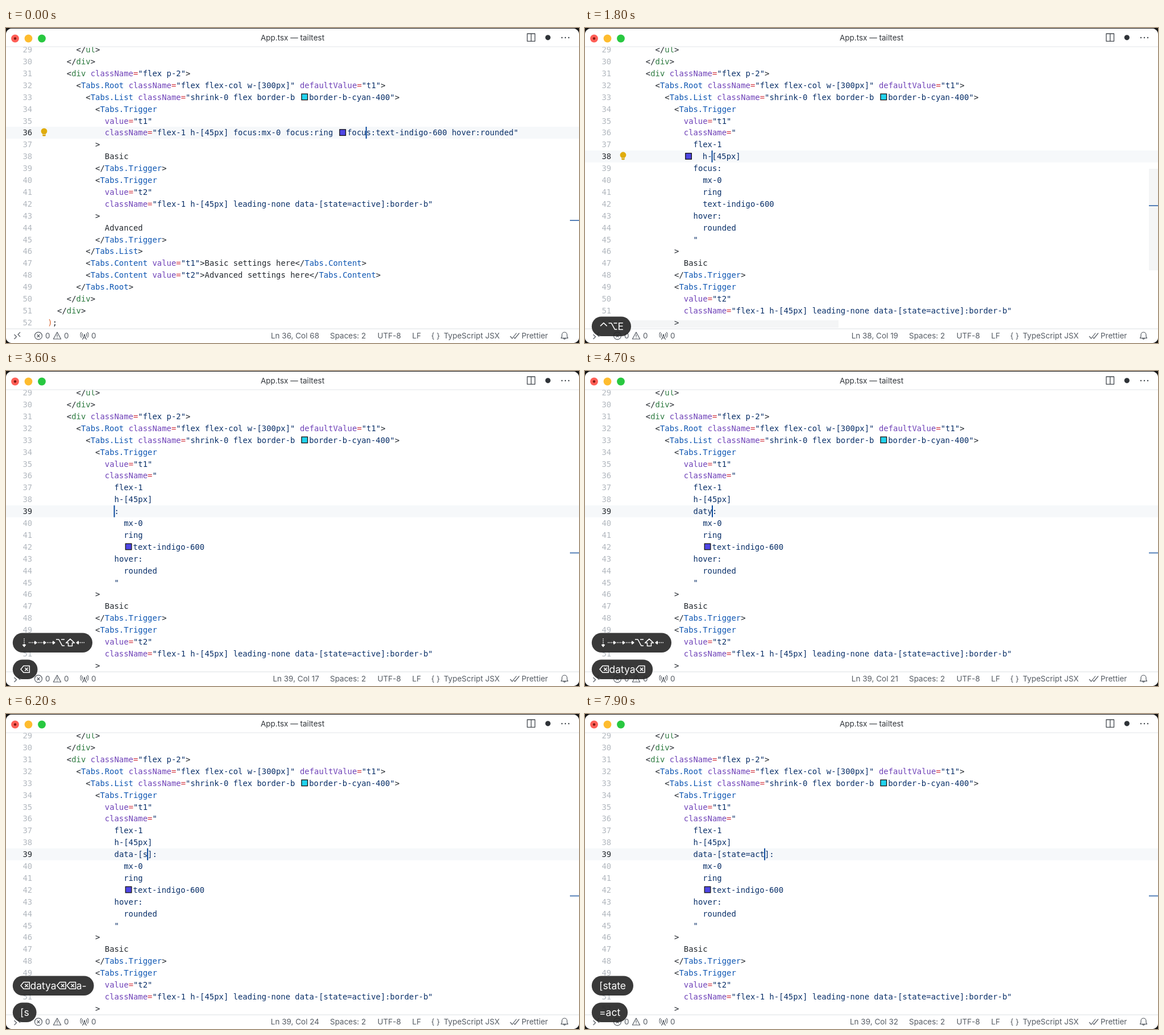
Animation of 1008x555 px, one loop 8000 ms. Source, as an HTML page:

```html
<!DOCTYPE html>
<html lang="en">
<head>
<meta charset="utf-8">
<title>Editor</title>
<style>
html, body { margin: 0; width: 100%; height: 100%; overflow: hidden; background: #151515; }
svg { display: block; width: 1008px; height: 555px; }
text { white-space: pre; }
.code { font: 13.9px "DejaVu Sans Mono", monospace; }
.ui { font: 13.5px Inter, sans-serif; fill: #565c64; }
.key { font: 17.5px Inter, sans-serif; fill: #fff; }
</style>
</head>
<body>
<svg id="stage" viewBox="0 0 1008 555" xml:space="preserve"></svg>
<script>
const LOOP = 8000;
const CW = 8.37, X0 = 56.6, ROW = 20.9, FIRST = 29, LAST = 52, SWATCH = 16.3;
const EXPAND = 700, RECOLOR = 1900, NAV = 2200, ERASE = 3400;
const C = { text: '#24292f', str: '#0a3069', html: '#2c7a3f', comp: '#0f57b3', attr: '#6f42b8', eq: '#d1333d', paren: '#d9622b' };
const swatches = { '¤': '#22d3ee', '§': '#4f46e5' };

// Pressed keys: [time, symbols]
const keys = [
  [EXPAND, '⌃⌥E'],
  [NAV, '⇣'], [2300, '⇢'], [2400, '⇢'], [2500, '⇢'], [2700, '⌥⇧⇠'],
  [ERASE, '⌫'], [3900, 'da'], [4100, 't'], [4200, 'y'], [4600, 'a'], [4700, '⌫'], [4800, '⌫'], [4900, 'a'], [5300, '-'],
  [6000, '['], [6200, 's'], [6400, 't'], [6500, 'a'], [6600, 't'], [6700, 'e'],
  [7300, '='], [7500, 'a'], [7700, 'c'], [7900, 't']
];

// Key symbols: advance and outline, relative to the baseline
const glyphs = {
  '⌃': [15.5, 'M2,-7L7.8,-12.5L13.6,-7'],
  '⌥': [17, 'M1,-12H6L12,-1H16M10,-12H16'],
  '⇧': [18, 'M9,-13L16.5,-6H12.5V-.5H5.5V-6H1.5Z'],
  '⌫': [17.5, 'M6,-12.5H16.3V-.8H6L1,-6.6ZM8.3,-9.3L13.6,-4M13.6,-9.3L8.3,-4'],
  '⇢': [16, 'M1,-6.5H2.6M4,-6.5H5.6M7,-6.5H8.6M10,-6.5H14.5M11.8,-8.8L14.8,-6.5L11.8,-4.2Z'],
  '⇠': [17, 'M16,-6.5H14.4M13,-6.5H11.4M10,-6.5H8.4M7,-6.5H2.5M5.2,-8.8L2.2,-6.5L5.2,-4.2Z'],
  '⇣': [14, 'M7,-13.5V-12M7,-10.5V-9M7,-7.5V-6M7,-4.5V0M4.7,-2.5L7,.5L9.3,-2.5Z']
};

const pen = document.createElement('canvas').getContext('2d');
const esc = s => s.replace(/&/g, '&amp;').replace(/</g, '&lt;');
const text = (cls, x, y, s, extra = '') => `<text class="${cls}" x="${x}" y="${y}" ${extra}>${esc(s)}</text>`;
const rect = (x, y, w, h, fill, extra = '') => `<rect x="${x}" y="${y}" width="${w}" height="${h}" fill="${fill}" ${extra}/>`;
const dot = (x, y, r, fill) => `<circle cx="${x}" cy="${y}" r="${r}" fill="${fill}"/>`;
const line = (d, color = '#565c64', w = 1.2) => `<path d="${d}" fill="none" stroke="${color}" stroke-width="${w}" stroke-linejoin="round"/>`;
const rowY = n => 59 + (n - 30) * ROW;
const colX = c => X0 + (c - 1) * CW;
const clamp = v => Math.max(0, Math.min(1, v));

const head = [
  '        </ul>',
  '      </div>',
  '      <div className="flex p-2">',
  '        <Tabs.Root className="flex flex-col w-[300px]" defaultValue="t1">',
  '          <Tabs.List className="shrink-0 flex border-b ¤border-b-cyan-400">',
  '            <Tabs.Trigger',
  '              value="t1"'
];
const tail = [
  '            >',
  '              Basic',
  '            </Tabs.Trigger>',
  '            <Tabs.Trigger',
  '              value="t2"',
  '              className="flex-1 h-[45px] leading-none data-[state=active]:border-b"',
  '            >',
  '              Advanced',
  '            </Tabs.Trigger>',
  '          </Tabs.List>',
  '          <Tabs.Content value="t1">Basic settings here</Tabs.Content>',
  '          <Tabs.Content value="t2">Advanced settings here</Tabs.Content>',
  '        </Tabs.Root>',
  '      </div>',
  '    </div>',
  '  );'
];

function codeLines(t, word) {
  if (t < EXPAND) return [...head,
    '              className="flex-1 h-[45px] focus:mx-0 focus:ring §focus:text-indigo-600 hover:rounded"', ...tail];
  const late = t >= RECOLOR, pad = '~' + ' '.repeat(16);
  return [...head, '              className="',
    pad + 'flex-1',
    late ? pad + 'h-[45px]' : '~' + ' '.repeat(14) + '§  h-[45px]',
    pad + word + ':',
    pad + '  mx-0', pad + '  ring',
    pad + (late ? '  §' : '  ') + 'text-indigo-600',
    pad + 'hover:', pad + '  rounded', pad + '"', ...tail];
}

function tokens(s) {
  if (s[0] === '~') return [[s.slice(1), C.str]];
  const re = /("[^"]*"?)|(?<=<\/?)([\w.]+)|(\w+)(?==)|(=)|(\))|(\w+|.)/g;
  return [...s.matchAll(re)].map(m => [m[0],
    m[1] ? C.str : m[2] ? (/^[a-z]/.test(m[2]) ? C.html : C.comp) : m[3] ? C.attr : m[4] ? C.eq : m[5] ? C.paren : C.text]);
}

function codeRow(s, y) {
  let x = X0, out = '';
  for (const [tok, color] of tokens(s))
    for (const part of tok.split(/([¤§])/)) {
      if (swatches[part]) {
        out += rect(x + 3, y - 5.6, 10.6, 10.6, swatches[part], 'stroke="#111" stroke-width="1.3"');
        x += SWATCH;
        continue;
      }
      const lead = part.length - part.trimStart().length;
      if (part.trim()) out += text('code', x + lead * CW, y + 5, part.slice(lead), `fill="${color}"`);
      x += part.length * CW;
    }
  return out;
}

function typedWord(t) {
  let w = '';
  for (const [at, s] of keys) if (at >= ERASE && at <= t) w = s === '⌫' ? w.slice(0, -1) : w + s;
  return w;
}

function caret(t) {
  if (t < EXPAND) return { ln: 36, col: 68, shift: SWATCH, mark: 339 };
  if (t < NAV) return { ln: 38, col: 19, shift: t < RECOLOR ? SWATCH : 0, mark: 313 };
  const steps = keys.filter(([at, s]) => s === '⇢' && at <= t).length;
  const col = t < 2700 ? 19 + steps : 17 + typedWord(t).length;
  return { ln: 39, col, shift: 0, mark: 320.5, selected: t >= 2700 && t < ERASE };
}

const bulb = y => dot(67, y - 2.5, 5.4, '#e0ac0c') + rect(64.3, y + 1, 5.4, 5, '#d6a30a', 'rx="1"') +
  line(`M64.5,${y + 3}H69.5`, '#fff', .8);

function editor(t) {
  const cur = caret(t), y = rowY(cur.ln);
  const word = t < ERASE ? 'focus' : typedWord(t);
  const lines = codeLines(t, word + (word.includes('[') ? ']' : ''));
  let out = rect(0, y - 10.4, 1008, ROW, '#f6f8fa');
  if (cur.selected) out += rect(colX(17), y - 10.4, 5 * CW, ROW, '#d3e3f5');
  for (let n = FIRST; n <= LAST; n++) {
    out += text('code', 29.4, rowY(n) + 5, String(n), `fill="${n === cur.ln ? '#24292f' : '#b2b8bf'}"`);
    out += codeRow(lines[n - FIRST], rowY(n));
  }
  if (t < EXPAND || (t >= 1000 && t < NAV) || (t >= 2500 && t < 3500)) out += bulb(y);
  out += rect(colX(cur.col) + cur.shift - 1, y - 10.4, 2, ROW, '#0b4a9e');
  if (t >= 6100 && t < 6200)
    out += rect(241, 280, 500, 42, '#f6f8fa') + text('code', 246, 295, '{} propr-data-[]:', `fill="${C.text}"`);
  const fade = t < EXPAND ? 0 : 1 - clamp((t - 1500) / 500);
  out += `<g opacity="${fade}">${rect(992, 248, 16, 179, '#8c959f', 'fill-opacity=".24"')}${rect(57, 515, 389, 13, '#8c959f', 'fill-opacity=".24"')}</g>`;
  return out + rect(992, cur.mark - 1, 16, 2, '#5580b8');
}

function titleBar(alt) {
  const ink = '#44494f';
  let out = rect(0, 1, 1008, 32, '#fff') + rect(0, 32.5, 1008, 1, '#e3e6e9');
  out += dot(16, 18.5, 6.9, '#ff5f57') + dot(16, 18.5, 2.2, '#7e1610') + dot(39.5, 18.5, 6.9, '#febc2e') + dot(63, 18.5, 6.9, '#28c840');
  out += text('ui', 504, 22, 'App.tsx — tailtest', 'text-anchor="middle" style="fill:#33373c"');
  out += line('M917,10H930.5V23.3H917Z' + (alt ? 'M917,16.7H930.5' : 'M923.8,10V23.3'), ink, 1.3);
  out += alt
    ? line('M947,13.5H957V23.3H947ZM950,13V10.3H960.3V20H957.5M949.7,16L954.3,20.8M954.3,16L949.7,20.8', ink, 1.2)
    : dot(953.3, 16.8, 4.6, '#2f3338');
  return out + [978, 984, 990].map(x => dot(x, 17, 1.2, ink)).join('');
}

function statusBar(cur) {
  const ui = (x, s) => text('ui', x, 547.3, s);
  const where = `Ln ${cur.ln}, Col ${cur.col}` + (cur.selected ? ' (5 selected)' : '');
  return rect(0, 530, 1008, 25, '#fff') + rect(0, 529.5, 1008, 1, '#dce0e4') +
    line('M14.5,540L18.5,544L14.5,548M25,536L21,540L25,544') +
    line('M50.5,542.3a6.5,6.5 0 1 0 13,0a6.5,6.5 0 1 0 -13,0M54.5,539.8L59.5,544.8M59.5,539.8L54.5,544.8') + ui(69, '0') +
    line('M90,536L96.6,548H83.4ZM90,540V544.3M90,545.5V546.7') + ui(102, '0') +
    line('M138,541L134.5,549M138,541L141.5,549M136,546H140M134.8,543.5a4.5,4.5 0 0 1 0,-5.5M141.2,543.5a4.5,4.5 0 0 0 0,-5.5M132.7,545.5a7.5,7.5 0 0 1 0,-9.5M143.3,545.5a7.5,7.5 0 0 0 0,-9.5') +
    dot(138, 540.8, 1.4, '#565c64') + ui(150, '0') +
    text('ui', 551, 547.3, where, 'text-anchor="end"') +
    ui(570, 'Spaces: 2') + ui(653.5, 'UTF-8') + ui(714.5, 'LF') + ui(748, '{ }') + ui(770, 'TypeScript JSX') +
    line('M887,543L890.5,547L898,537.5M893.5,545.2L895.3,547L903,537.5') + ui(907, 'Prettier') +
    line('M976.5,546.3H988.5L987,543.5V540.5A4.5,4.5 0 0 0 978,540.5V543.5ZM980.8,547a1.8,1.8 0 0 0 3.4,0');
}

function bezel(b, level, t) {
  const top = 508.5 - level * 47, base = top + 23.6;
  let x = 25, out = '';
  for (const part of b.text.match(/[⌃⌥⇧⌫⇢⇠⇣]|[^⌃⌥⇧⌫⇢⇠⇣]+/g)) {
    const g = glyphs[part];
    if (g) out += `<g transform="translate(${x} ${base})">${line(g[1], '#fff', 1.5)}</g>`;
    else out += text('key', x, base, part);
    x += g ? g[0] : pen.measureText(part).width;
  }
  const alpha = 1 - clamp((t - b.last - 2150) / 150);
  return alpha ? `<g opacity="${alpha}">${rect(11.8, top, x + 13 - 11.8, 34.5, '#292929', 'rx="17.2" fill-opacity=".92"')}${out}</g>` : '';
}

function bezels(t) {
  const groups = [];
  for (const [at, s] of keys) {
    if (at > t) break;
    const g = groups[groups.length - 1];
    if (g && at - g.last < 550) { g.text += s; g.last = at; }
    else groups.push({ text: s, last: at });
  }
  return groups.reverse().map((g, i) => bezel(g, i, t)).join('');
}

const stage = document.getElementById('stage');
let shown = '';
function draw() {
  const t = performance.now() % LOOP;
  const alt = (t >= 500 && t < 1100) || (t >= 2600 && t < 2900);
  pen.font = '17.5px Inter, sans-serif';
  const view = '<defs><clipPath id="win"><rect y="1" width="1008" height="554" rx="10"/></clipPath></defs>' +
    '<g clip-path="url(#win)">' + rect(0, 0, 1008, 555, '#fff') +
    editor(t) + titleBar(alt) + statusBar(caret(t)) + '</g>' + bezels(t);
  if (view !== shown) stage.innerHTML = shown = view;
  requestAnimationFrame(draw);
}
draw();
</script>
</body>
</html>
```
